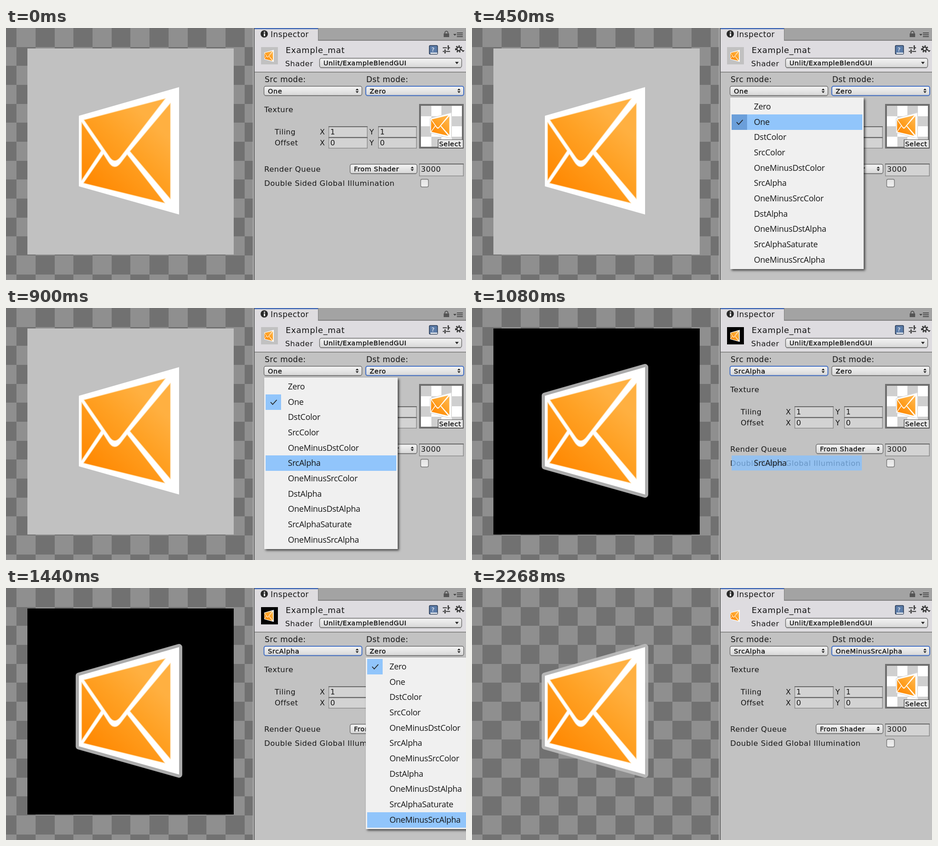
An HTML page with a canvas that plays this animation: 1010 by 554 pixels, repeating every 2.52 s.

```html
<!DOCTYPE html>
<html>
<head>
<meta charset="utf-8">
<style>
html, body { margin: 0; width: 100%; height: 100%; overflow: hidden; background: #c2c2c2; }
canvas { display: block; }
</style>
</head>
<body>
<canvas id="stage" width="1010" height="554"></canvas>
<script>
const ctx = document.getElementById('stage').getContext('2d');
const MODES = ['Zero', 'One', 'DstColor', 'SrcColor', 'OneMinusDstColor', 'SrcAlpha', 'OneMinusSrcColor',
  'DstAlpha', 'OneMinusDstAlpha', 'SrcAlphaSaturate', 'OneMinusSrcAlpha'];
const ROW = 33.65, MENU_TOP = 153, MENU_WIDTH = 293;
const SRC_X = 567, DST_X = 790;
const LOOP = 2520;
const HIGHLIGHT = '#91c5fb';

// Each step lasts until `end`.
const STEPS = [
  { end: 180, src: 'One', dst: 'Zero', focus: 'dst' },
  { end: 630, src: 'One', dst: 'Zero', focus: 'dst', menu: SRC_X, checked: 1, hover: 1 },
  { end: 1080, src: 'One', dst: 'Zero', focus: 'dst', menu: SRC_X, checked: 1, hover: 5 },
  { end: 1260, src: 'SrcAlpha', dst: 'Zero', focus: 'src', fading: 5 },
  { end: 1440, src: 'SrcAlpha', dst: 'Zero', focus: 'src', menu: DST_X, checked: 0, hover: 0 },
  { end: 1890, src: 'SrcAlpha', dst: 'Zero', focus: 'src', menu: DST_X, checked: 0, hover: 10 },
  { end: LOOP, src: 'SrcAlpha', dst: 'OneMinusSrcAlpha', focus: 'dst' }
];

function rect(x1, y1, x2, y2, fill) {
  ctx.fillStyle = fill;
  ctx.fillRect(x1, y1, x2 - x1, y2 - y1);
}

function shape(path, fill, stroke, width = 1) {
  const p = new Path2D(path);
  if (fill) { ctx.fillStyle = fill; ctx.fill(p); }
  if (stroke) { ctx.strokeStyle = stroke; ctx.lineWidth = width; ctx.stroke(p); }
}

function text(str, x, y, size = 16.5, family = 'DejaVu Sans', spacing = 0.5, color = '#161616') {
  ctx.font = `${size}px "${family}", sans-serif`;
  ctx.letterSpacing = spacing + 'px';
  ctx.fillStyle = color;
  ctx.fillText(str, x, y);
}

function boldText(str, x, y) {
  text(str, x, y, 14.5, 'DejaVu Sans', 0.65);
  ctx.strokeStyle = '#161616';
  ctx.lineWidth = 0.45;
  ctx.strokeText(str, x, y);
}

function vertical(y1, y2, from, to) {
  const g = ctx.createLinearGradient(0, y1, 0, y2);
  g.addColorStop(0, from);
  g.addColorStop(1, to);
  return g;
}

function roundBox(x1, y1, x2, y2, fill, stroke, width = 1, radius = 4) {
  ctx.beginPath();
  ctx.roundRect(x1 + .5, y1 + .5, x2 - x1 - 1, y2 - y1 - 1, radius);
  ctx.fillStyle = fill;
  ctx.fill();
  ctx.strokeStyle = stroke;
  ctx.lineWidth = width;
  ctx.stroke();
}

function popup(label, x1, y1, x2, focused, single) {
  const y2 = y1 + 21.5, mid = y1 + 10.5;
  rect(x1 + 2, y2, x2 - 2, y2 + 1, '#a4a4a4');
  roundBox(x1, y1, x2, y2, vertical(y1, y2, '#f5f5f5', '#d6d6d6'), focused ? '#4470c4' : '#686868', focused ? 2 : 1.4);
  boldText(label, x1 + 9, y1 + 16);
  const a = x2 - 11;
  if (single) shape(`M${a - 4} ${mid - 2}h8l-4 5z`, '#222');
  else shape(`M${a - 3.5} ${mid - 1}h7l-3.5 -4zM${a - 3.5} ${mid + 1}h7l-3.5 4z`, '#222');
}

function field(label, x1, y1, x2, y2) {
  rect(x1, y1, x2, y2, '#8c8c8c');
  rect(x1, y1, x2, y1 + 2, '#686868');
  rect(x1 + 1.5, y1 + 2, x2 - 1.5, y2 - 1.5, '#d3d3d3');
  text(label, x1 + 4, y1 + 18);
}

function checker(x, y, w, h, size, offset, first, second) {
  ctx.save();
  ctx.beginPath();
  ctx.rect(x, y, w, h);
  ctx.clip();
  rect(x, y, x + w, y + h, second);
  for (let r = 0; r * size < h; r++)
    for (let c = r % 2; c * size + offset < w; c += 2) {
      const left = x + offset + c * size, top = y + r * size;
      rect(Math.round(left), Math.round(top), Math.round(left + size), Math.round(top + size), first);
    }
  ctx.restore();
}

function envelope(outline) {
  const body = 'M160 193L380 130V410L160 348Z';
  ctx.lineJoin = 'round';
  if (outline) shape(body, null, outline, 14);
  shape(body, '#fff');
  const g = ctx.createLinearGradient(180, 350, 350, 165);
  g.addColorStop(0, '#ff8700');
  g.addColorStop(.5, '#ffa124');
  g.addColorStop(.8, '#ffb041');
  shape('M171 202L350 155L251 284Q238 300 227 283Z' +
    'M166 207L209 270L166 335Z' +
    'M361 165V376L272 271Z' +
    'M170 341L214 277L224 293Q238 316 253 295L266 278L349 385Z', g, 'rgba(255,226,178,.7)', 1.6);
}

function smallEnvelope(x, y, scaleX, scaleY, outline) {
  ctx.save();
  ctx.translate(x, y);
  ctx.scale(scaleX, scaleY);
  ctx.translate(-160, -130);
  envelope(outline);
  ctx.restore();
}

function preview(step) {
  checker(0, 0, 543, 554, 41.67, -18.2, '#717171', '#8f8f8f');
  const blended = step.dst !== 'Zero', alpha = step.src === 'SrcAlpha';
  if (!blended) rect(47, 45, 500, 498, alpha ? '#000' : '#c1c1c1');
  envelope(alpha && 'rgba(190,190,190,.9)');
}

function header(step) {
  rect(543, 0, 1010, 554, '#c2c2c2');
  rect(543, 0, 1010, 27, '#a3a3a3');
  rect(545, 26, 1010, 28, '#808080');
  rect(545, 28, 1010, 97, '#dedce0');
  rect(545, 0, 686, 28, '#808080');
  rect(546, 0, 685, 28, '#dedcdf');
  rect(546, 0, 685, 2.5, '#4169b5');
  rect(545, 96, 1010, 98, '#8a8a8a');
  rect(542, 0, 544, 554, '#b4b4b4');
  rect(544, 0, 546, 554, '#686868');

  shape('M559 13a8 8 0 1 0 16 0a8 8 0 1 0 -16 0', '#292929');
  rect(566, 8, 569, 10.5, '#fff');
  rect(566, 12, 569, 18, '#fff');
  text('Inspector', 581, 20, 17);
  shape('M963.5 13v-2a3.5 4 0 0 1 7 0v2', null, '#555', 2);
  rect(961, 12, 973, 20, '#555');
  shape('M982 13h7l-3.5 4z', '#444');
  for (const y of [10, 14, 18]) rect(990, y, 1003, y + 1.8, '#444');

  if (step.dst === 'Zero') rect(560, 42, 597, 80, step.src === 'One' ? '#c1c1c1' : '#000');
  smallEnvelope(567, 48, .095, .095);
  text('Example_mat', 614, 55, 18, 'DejaVu Sans', .65);
  text('Shader', 613, 84);
  popup('Unlit/ExampleBlendGUI', 688, 66, 1001, false, true);

  roundBox(929, 38, 948, 58, '#5b7ba8', '#26364f', 1.5, 2);
  rect(932, 54, 947, 57, '#e4e8ee');
  text('?', 934, 52, 13, 'DejaVu Sans', 0, '#fff');
  shape('M959 43.5h9M972 43.5h3M959 51.5h3M966 51.5h9', null, '#333', 2);
  shape('M971 38v10M964 47v9', null, '#333', 2.6);
  ctx.setLineDash([2.7, 2.8]);
  shape('M987.5 46a6.5 6.5 0 1 0 13 0a6.5 6.5 0 1 0 -13 0', null, '#333', 3);
  ctx.setLineDash([]);
  shape('M990 46a4 4 0 1 0 8 0a4 4 0 1 0 -8 0', null, '#333', 2.6);
  shape('M1000 49h7l-3.5 4z', '#333');
}

function properties(step) {
  text('Src mode:', 568, 119, 17);
  text('Dst mode:', 791, 119, 17);
  popup(step.src, 566, 127.5, 782, step.focus === 'src');
  popup(step.dst, 789.5, 127.5, 1005.5, step.focus === 'dst');

  text('Texture', 567, 185);
  [['Tiling', '1', 216], ['Offset', '0', 240]].forEach(([label, value, y]) => {
    text(label, 590, y + 18, 16);
    text('X', 689, y + 18, 16);
    text('Y', 798, y + 18, 16);
    field(value, 708, y, 794, y + 25);
    field(value, 817, y, 902, y + 25);
  });

  rect(907, 167, 1005, 265, '#6e6e6e');
  checker(911, 171, 90, 90, 22.5, 0, '#cfcfcf', '#fff');
  smallEnvelope(932, 187, .206, .196, '#dcdcdc');
  rect(948, 245, 1004, 265, '#555');
  rect(949.5, 246, 1003, 263, '#e9e9e9');
  boldText('Select', 951, 260);

  text('Render Queue', 567, 316);
  popup('From Shader', 755, 299, 903);
  field('3000', 907, 298, 1005, 326);
  text('Double Sided Global Illumination', 567, 347);
  roundBox(910, 332, 928, 350, vertical(332, 350, '#e2e2e2', '#f0f0f0'), '#757575', 1.4, 3);
}

function menuText(index, x) {
  text(MODES[index], x + 52, MENU_TOP + 26 + index * ROW, 18, 'Open Sans', -.25, '#151515');
}

function menu({ menu: x, checked, hover }) {
  const bottom = MENU_TOP + 377, rowTop = i => Math.round(MENU_TOP + 3 + i * ROW);
  ctx.save();
  ctx.shadowColor = 'rgba(0,0,0,.65)';
  ctx.shadowBlur = 5;
  ctx.shadowOffsetX = ctx.shadowOffsetY = 3;
  rect(x, MENU_TOP, x + MENU_WIDTH, bottom, '#f0f0f0');
  ctx.restore();
  const h = rowTop(hover), c = rowTop(checked);
  rect(x + 3, h, x + 290, h + 34, HIGHLIGHT);
  rect(x + 3, c, x + 37, c + 34, hover === checked ? '#6b9fda' : HIGHLIGHT);
  ctx.lineJoin = 'miter';
  shape(`M${x + 14} ${c + 17}l4.5 5l9 -10`, null, '#222', 1.8);
  MODES.forEach((_, i) => menuText(i, x));
}

function fadingRow(index) {
  const top = MENU_TOP + 3 + index * ROW;
  ctx.globalAlpha = .75;
  rect(SRC_X + 3, top, SRC_X + 289, top + 33, '#85c0ff');
  ctx.globalAlpha = 1;
  menuText(index, SRC_X);
}

function draw(now) {
  const time = now % LOOP;
  const step = STEPS.find(s => time < s.end);
  preview(step);
  header(step);
  properties(step);
  if (step.menu) menu(step);
  if (step.fading) fadingRow(step.fading);
  requestAnimationFrame(draw);
}
requestAnimationFrame(draw);
</script>
</body>
</html>
```
